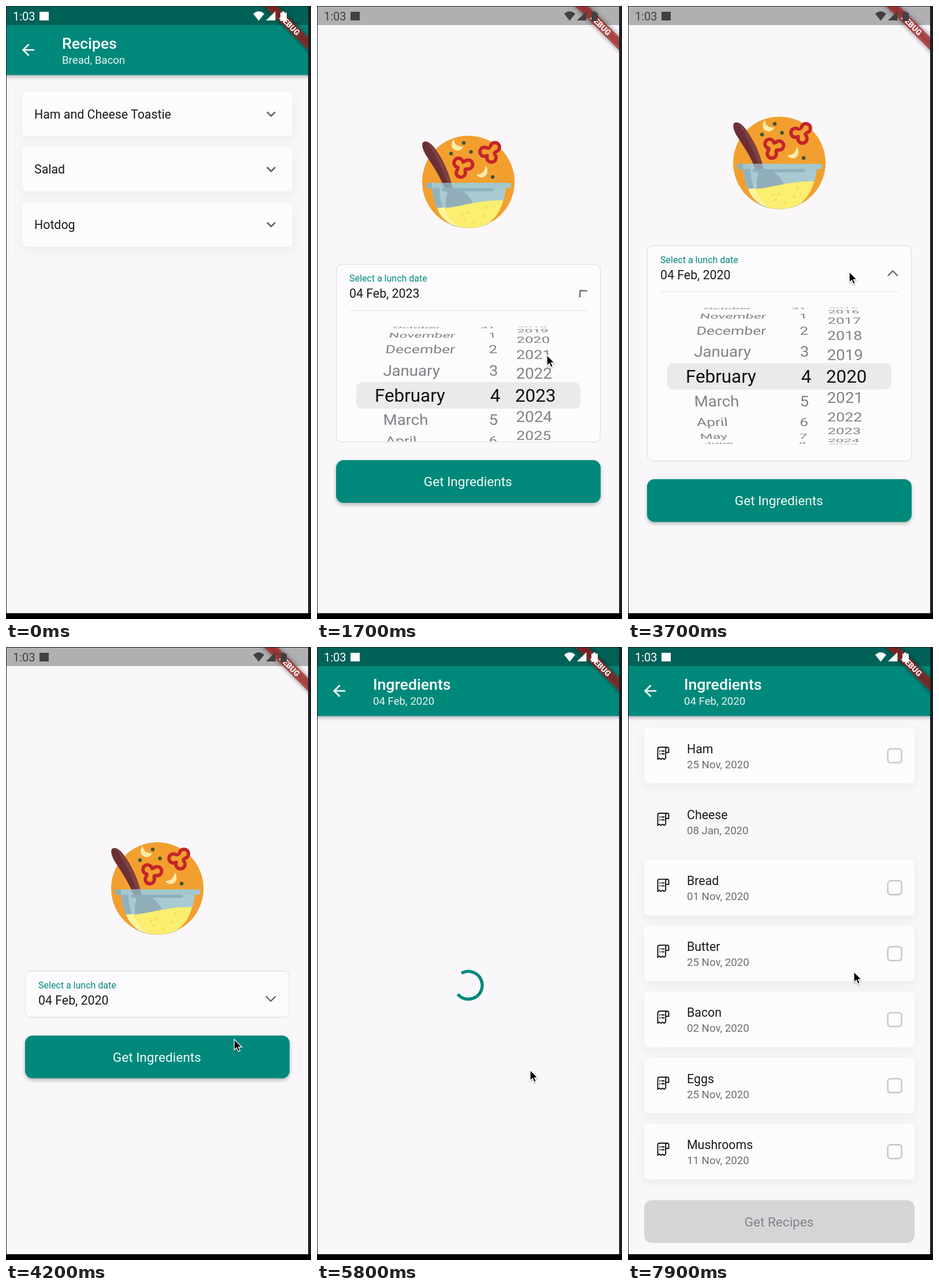
Recreate the animation shown at these times as an HTML page. Size 528 px wide and 1061 px high, loop 8000 ms.

```html
<!DOCTYPE html>
<html lang="en">
<head>
<meta charset="utf-8">
<title>Lunch recipes</title>
<style>
  html, body { margin: 0; width: 100%; height: 100%; overflow: hidden; background: #000; }
  svg { display: block; width: 528px; height: 1061px; font-family: Roboto, sans-serif; }
  .card { fill: #fdfbfe; filter: drop-shadow(0 5px 9px rgba(0, 0, 0, .055)); }
  .bar { fill: #00897b; filter: drop-shadow(0 3px 3px rgba(0, 0, 0, .28)); }
  .line { fill: none; stroke-linecap: round; stroke-linejoin: round; }
</style>
</head>
<body>
<svg viewBox="0 0 528 1061">
  <defs>
    <clipPath id="screen"><path d="M1 1H523V1051H1z"/></clipPath>
    <clipPath id="listArea"><path d="M1 119H523V932H1z"/></clipPath>
    <clipPath id="cardClip"><rect id="cardClipBox" x="33" y="561" width="458" height="80"/></clipPath>
    <filter id="blur" x="-20%" y="-100%" width="140%" height="300%"><feGaussianBlur stdDeviation="4"/></filter>
  </defs>
  <path d="M0 0H528V1051H0z" fill="#1c2022"/>
  <path d="M0 1051H524V1061H0z"/>
  <g clip-path="url(#screen)">
    <path d="M0 0H528V1061H0z" fill="#f9f7fa"/>
    <g id="home">
      <path d="M0 0H528V33H0z" fill="#b0afb1"/>
      <g id="logo"></g>
      <g id="form">
        <g id="field">
          <rect id="fieldBox" x="33.5" y="561" width="457" height="80" rx="9" fill="#fdfbfe" stroke="#e3e1e4" stroke-width="1.3"/>
          <text x="56" y="591" font-size="16" fill="#00897b">Select a lunch date</text>
          <text id="dateText" x="56" y="619" font-size="21.33" fill="#1b1a1d"></text>
          <path id="fieldArrow" class="line" d="M-8 -4L0 4L8 -4" stroke="#626164" stroke-width="2.2"/>
          <g clip-path="url(#cardClip)">
            <path d="M56 640.7H468" stroke="#e5e3e7"/>
            <rect x="68" y="764.5" width="388" height="46" rx="11" fill="#ebe9ec"/>
            <g id="wheels"></g>
          </g>
        </g>
        <g id="getButton">
          <rect class="bar" x="33" y="672.5" width="458" height="74" rx="13"/>
          <text x="261.3" y="717.7" font-size="22.6" fill="#f1faf8" text-anchor="middle">Get Ingredients</text>
        </g>
      </g>
    </g>
    <g id="page">
      <path d="M0 0H528V1061H0z" fill="#f9f7fa"/>
      <g id="recipes"></g>
      <g id="ingredients">
        <g clip-path="url(#listArea)"><g id="list"></g></g>
        <rect x="28" y="957.5" width="468" height="74" rx="13" fill="#d6d4d7"/>
        <text x="261.5" y="1002.5" font-size="22.6" fill="#848286" text-anchor="middle">Get Recipes</text>
      </g>
      <circle id="spinner" r="24" fill="none" stroke="#00897b" stroke-width="5.33" pathLength="360"/>
      <rect class="bar" x="-9" y="20" width="546" height="99.5"/>
      <path d="M0 0H528V33H0z" fill="#006157"/>
      <path transform="translate(22.5 60) scale(1.333)" fill="#fff" d="M20 11H7.83l5.59-5.59L12 4l-8 8 8 8 1.41-1.41L7.83 13H20z"/>
      <text id="title" x="97" y="73.6" font-size="26.67" font-weight="500" fill="#fff"></text>
      <text id="subtitle" x="97" y="100" font-size="18.67" fill="#e6f4f2"></text>
    </g>
    <g transform="translate(523 1) rotate(45)">
      <path d="M-60 37.3H60V53.3H-60z" fill-opacity=".5" filter="url(#blur)"/>
      <path d="M-60 37.3H60V53.3H-60z" fill="#b71c1c" fill-opacity=".63"/>
      <text y="50" font-size="13.6" font-weight="900" fill="#fff" text-anchor="middle">DEBUG</text>
    </g>
    <g id="status">
      <text x="12" y="24.7" font-size="20">1:03</text>
      <rect x="58" y="10" width="16" height="15"/>
      <path d="M437.5 25.5L428 13.5Q437.5 5 447 13.5zM450 25H466.500V9zM478 9.500H482V11.500H486V26H475V11.500H478z"/>
    </g>
  </g>
  <path id="cursor" d="M0 0V18.500L4.300 14.700L7 21.200L10.200 19.800L7.500 13.500H13.300z" stroke="#fff" stroke-width="1.300"
    style="filter:drop-shadow(0 2px 1px rgba(0,0,0,.25))"/>
</svg>
<script>
const LOOP = 8000, STEP = 100, SHIFT = 146.5;
const $ = id => document.getElementById(id);
const clamp = x => Math.min(1, Math.max(0, x));
const set = (id, attrs) => { for (const k in attrs) $(id).setAttribute(k, attrs[k]); };
const show = (id, visible) => { $(id).style.display = visible ? '' : 'none'; };

// cubic-bezier(.4, 0, .2, 1)
function ease(x) {
  x = clamp(x);
  let lo = 0, hi = 1;
  for (let i = 0; i < 20; i++) {
    const p = (lo + hi) / 2, q = 1 - p;
    if (1.2 * q * q * p + .6 * q * p * p + p ** 3 < x) lo = p; else hi = p;
  }
  return 3 * (1 - lo) * lo * lo + lo ** 3;
}
const ramp = (t, from, to) => ease((t - from) / (to - from));

function follow(t, keys) {
  let i = 0;
  while (i < keys.length - 2 && t >= keys[i + 1][0]) i++;
  const [a, b] = [keys[i], keys[i + 1]], u = clamp((t - a[0]) / (b[0] - a[0]));
  const k = u * u * (3 - 2 * u);
  return a.slice(1).map((v, j) => v + (b[j + 1] - v) * k);
}

/* ---- static drawings ---- */
function pepper(lobes, x, y) {
  const layer = (r, color) => lobes.map(([a, b]) =>
    `<circle cx="${a}" cy="${b}" r="${r}" fill="${color}"/>
     <path class="line" d="M${a} ${b}L${x} ${y}" stroke="${color}" stroke-width="${r * 1.5}"/>`).join('');
  return layer(10.8, '#c4242a') + layer(5, '#f29f2f');
}
const dots = (points, r, color) =>
  points.map(([x, y]) => `<circle cx="${x}" cy="${y}" r="${r}" fill="${color}"/>`).join('');

$('logo').innerHTML = `
  <circle cx="262" cy="418" r="80" fill="#f29f2f"/>
  <path fill="#fbeca6" d="M237 344C231 350 232 361 240 363C246 365 251 362 253 357C244 357 237 353 237 344z
    M292 390C297 395 296 406 290 409C284 412 278 409 276 405C286 405 291 399 292 390z"/>
  ${dots([[254, 350.5], [232, 369], [266.5, 366], [304, 409.5]], 3.2, '#3a5630')}
  ${pepper([[245, 385], [261.5, 388], [249, 402]], 251, 391)}
  ${pepper([[290, 366], [308, 358], [302, 376]], 300, 366)}
  <path fill="#6a3035" d="M183 350C188 345 197 350 204 360C217 378 227 398 233 422H218C207 398 197 385 187 369C183 361 181 354 183 350z"/>
  <path fill="#7f4041" d="M190 348C210 364 226 396 233 422H226C219 398 204 370 190 348z"/>
  <path fill="#a8cad0" d="M199 428H327C324 458 312 479 293 493Q262 502 233 493C212 479 202 458 199 428z"/>
  <path fill="#90b1bf" d="M199 428H212C212 455 222 475 240 495L233 493C212 479 202 458 199 428z"/>
  <path fill="#93aebb" d="M220 428H236C252 430 266 442 270 457L224 463C221 452 223 444 226 438z"/>
  <path fill="#fbee70" d="M208 463C238 466 272 449 322 450C317 470 308 482 293 492Q262 503 233 492C219 483 212 474 208 463z"/>
  <path fill="#fdf49b" d="M208 463L220 462C224 475 231 485 243 494L233 492C219 483 212 474 208 463z"/>
  ${dots([[255, 482], [261, 472], [288, 477], [293, 462], [272, 488], [251, 474]], 2.1, '#f6dd45')}
  <rect x="189" y="419.500" width="147" height="9.500" rx="3" fill="#a4c7ce"/>
  <path fill="#8eafbd" d="M192 419.500H199V429H192Q189 429 189 426V422.500Q189 419.500 192 419.500zM216 429H305Q308 431.500 305 434H216z"/>
  <path fill="#8d9fab" d="M216 419.500H232L235 429H221z"/>`;

$('recipes').innerHTML = ['Ham and Cheese Toastie', 'Salad', 'Hotdog'].map((name, i) =>
  `<g transform="translate(0 ${148.5 + i * 95.6})">
    <rect class="card" x="28" width="468" height="77" rx="7"/>
    <text x="49" y="46" font-size="21.33" fill="#1b1a1d">${name}</text>
    <path transform="translate(443 22.5) scale(1.333)" fill="#646367" d="M16.59 8.59L12 13.17 7.41 8.59 6 10l6 6 6-6z"/>
  </g>`).join('');

const foods = [['Ham', '25 Nov'], ['Cheese', '08 Jan', true], ['Bread', '01 Nov'], ['Butter', '25 Nov'],
  ['Bacon', '02 Nov'], ['Eggs', '25 Nov'], ['Mushrooms', '11 Nov']];
$('list').innerHTML = foods.map(([name, day, expired], i) =>
  `<g transform="translate(0 ${148 + i * 114.2})">
    ${expired ? '' : `<rect class="card" x="28" width="468" height="96" rx="7"/>
    <rect x="449.7" y="36.2" width="24" height="24" rx="5" fill="none" stroke="#c9c7ca" stroke-width="2.600"/>`}
    <path class="line" transform="translate(49.500 32)" stroke="#111" stroke-width="1.900"
      d="M18.500 1.500H5Q2 1.500 2 4.500V22.500l2.800-2 2.800 2 2.800-2 2.600 2 2.700-2V4.500Q15.700 1.500 18.400 1.500T21 4.500V10.500H15.700M5.500 8h.5M9 8h4M5.500 13h.5M9 13h4"/>
    <text x="102" y="43.500" font-size="21.33" fill="#1b1a1d">${name}</text>
    <text x="102" y="69.700" font-size="18.67" fill="#6f6d71">${day}, 2020</text>
  </g>`).join('');

/* ---- date wheels: rows on a cylinder seen in perspective ---- */
const MONTHS = 'January February March April May June July August September October November December'.split(' ');
const WHEELS = [
  { x: 113, mid: 160, vanish: 222, step: 16.4, label: n => MONTHS[(n + 12) % 12] },
  { x: 313.7, mid: 305, vanish: 283, step: 16.4, anchor: 'end', label: n => (n + 30) % 31 + 1 },
  { x: 344.5, mid: 376, vanish: 357, step: 14.2, label: n => n }
];
const RADIUS = 154, DEPTH = .00225;

function wheelRows({ x, mid, vanish, step, anchor = 'start', label }, pos) {
  let rows = '';
  for (let n = Math.round(pos) - 5; n <= Math.round(pos) + 5; n++) {
    const angle = (n - pos) * step * Math.PI / 180, sin = Math.sin(angle), cos = Math.cos(angle);
    if (Math.abs(angle) > 1.27) continue;
    const chosen = Math.abs(n - pos) <= .5, zoom = chosen ? 1.12 : 1;
    const s = 1 / (1 + DEPTH * RADIUS * (1 - cos));
    const matrix = [
      s * zoom, 0,
      -(mid - vanish) * DEPTH * sin * s * s, (cos * s - RADIUS * DEPTH * sin * sin * s * s) * zoom,
      vanish + (x - vanish) * s * zoom, 787 + RADIUS * sin * s * zoom
    ].map(v => v.toFixed(4));
    rows += `<text y="10" font-size="28" text-anchor="${anchor}" fill="${chosen ? '#111' : '#838185'}"
      transform="matrix(${matrix})">${label(n)}</text>`;
  }
  return rows;
}

/* ---- timeline ---- */
const cursorPath = [[1000, 540, 640], [1300, 400, 604], [1700, 398, 604], [2300, 381, 684], [2500, 381, 684],
  [2800, 383, 760], [3000, 382, 660], [3300, 384, 750], [3700, 383, 460], [3850, 383, 460], [4200, 395, 679],
  [4500, 382, 725], [4900, 382, 725], [5300, 369, 732], [5900, 369, 732], [7200, 391, 562], [8000, 391, 562]];
const yearPath = [[2500, 2023], [2800, 2021], [3000, 2021], [3400, 2020]];

function drawSpinner(t) {
  const life = t - 5800 + 1832, u = (life / 1333) % 1;
  const head = ease(u * 2) * 270, tail = ease(u * 2 - 1) * 270;
  const start = -90 + tail + life / 2222 * 360 + u * 90;
  set('spinner', { transform: `translate(262 585.5) rotate(${start})`,
    'stroke-dasharray': `${Math.max(head - tail, 1)} 720` });
}

function render(t) {
  const onRecipes = t < 100, enter = onRecipes ? 1 : ramp(t, 4850, 5200), loaded = t >= 6300;
  const open = ramp(t, 1500, 1900) - ramp(t, 3850, 4150);
  const [year] = follow(t, yearPath);

  show('home', !onRecipes && enter < 1);
  set('logo', { transform: `translate(0 ${-SHIFT * open})` });
  set('field', { transform: `translate(0 ${-SHIFT * open})` });
  set('getButton', { transform: `translate(0 ${SHIFT * open})` });
  set('form', { opacity: clamp((t - 800) / 200) });
  set('fieldBox', { height: 80 + 2 * SHIFT * open });
  set('cardClipBox', { height: 79 + 2 * SHIFT * open });
  set('fieldArrow', { transform: `translate(458.3 609) rotate(${180 * open})` });
  $('dateText').textContent = `04 Feb, ${Math.round(year)}`;
  $('wheels').innerHTML = open > 0 ? WHEELS.map((w, i) => wheelRows(w, [1, 4, year][i])).join('') : '';

  show('page', enter > 0);
  const scale = .85 + .15 * enter;
  set('page', { opacity: clamp(enter * 1.5),
    transform: `translate(262 526) scale(${scale}) translate(-262 -526)` });
  $('title').textContent = onRecipes ? 'Recipes' : 'Ingredients';
  $('subtitle').textContent = onRecipes ? 'Bread, Bacon' : '04 Feb, 2020';
  show('recipes', onRecipes);
  show('ingredients', loaded);
  show('spinner', !onRecipes && !loaded);
  drawSpinner(t);
  set('list', { transform: `translate(0 ${-8 * ramp(t, 7500, 7900)})` });

  set('status', { fill: enter > .5 ? '#fff' : '#414042' });
  show('cursor', t >= 1000);
  set('cursor', { transform: `translate(${follow(t, cursorPath)})` });
}

function tick() {
  render(Math.floor(performance.now() % LOOP / STEP) * STEP);
  requestAnimationFrame(tick);
}
tick();
</script>
</body>
</html>
```
